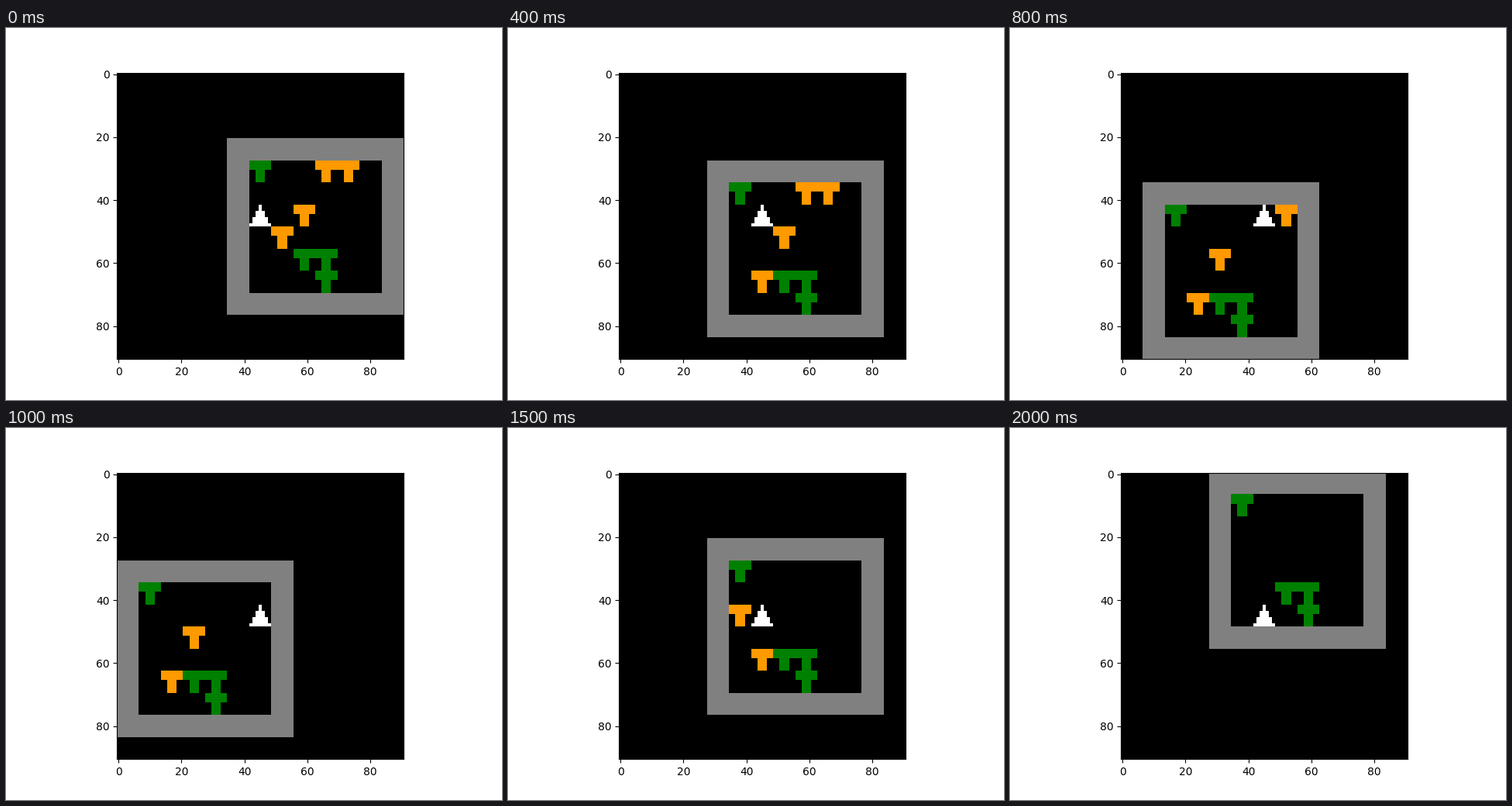
A matplotlib script that plays this animation: 640x480 px, repeating every 2100 ms.

```python
import numpy as np
import matplotlib.pyplot as plt
from matplotlib.animation import FuncAnimation

CELL, VIEW, ROOM = 7, 13, 6
MID = VIEW // 2
GRAY, GREEN, ORANGE, WHITE = (128, 128, 128), (0, 128, 0), (255, 153, 0), (255, 255, 255)

STEPS = {"R": (1, 0), "L": (-1, 0), "U": (0, -1), "D": (0, 1)}
MOVES = "RDUURRURRDLDLLLLDRDD"
START = (0, 2)
FIXED = [(0, 0), (2, 4), (3, 4), (3, 5)]
CRATES = [(3, 0), (4, 0), (2, 2), (1, 3)]

row, col = np.indices((CELL, CELL))
TEE = (row < 3) | (abs(col - 3) < 2)
CONE = abs(col - 3) <= row // 2


def play(n):
    """Position of the walker and the crates left after n moves."""
    x, y = START
    crates = set(CRATES)
    for move in MOVES[:n]:
        dx, dy = STEPS[move]
        x, y = x + dx, y + dy
        if (x, y) in crates:
            crates.remove((x, y))
            pushed = (x + dx, y + dy)
            # a crate shoved into the wall vanishes
            if all(0 <= p < ROOM for p in pushed):
                crates.add(pushed)
    return (x, y), crates


def stamp(img, mask, cx, cy, color):
    top, left = cy * CELL, cx * CELL
    img[top:top + CELL, left:left + CELL][mask] = color


def render(n):
    (x, y), crates = play(n)
    ox, oy = MID - x, MID - y
    img = np.zeros((VIEW * CELL, VIEW * CELL, 3), np.uint8)

    def fill(pad, color):
        rows = slice((oy - pad) * CELL, (oy + ROOM + pad) * CELL)
        cols = slice((ox - pad) * CELL, (ox + ROOM + pad) * CELL)
        img[rows, cols] = color

    fill(1, GRAY)
    fill(0, 0)
    for spots, color in ((FIXED, GREEN), (crates, ORANGE)):
        for cx, cy in spots:
            stamp(img, TEE, ox + cx, oy + cy, color)
    stamp(img, CONE, MID, MID, WHITE)
    return img


fig, ax = plt.subplots(figsize=(6.4, 4.8), dpi=100)
view = ax.imshow(render(0))


def update(n):
    view.set_data(render(n))
    return [view]


anim = FuncAnimation(fig, update, frames=len(MOVES) + 1, interval=100,
                     repeat=True, repeat_delay=0, blit=False)
plt.show()
```
